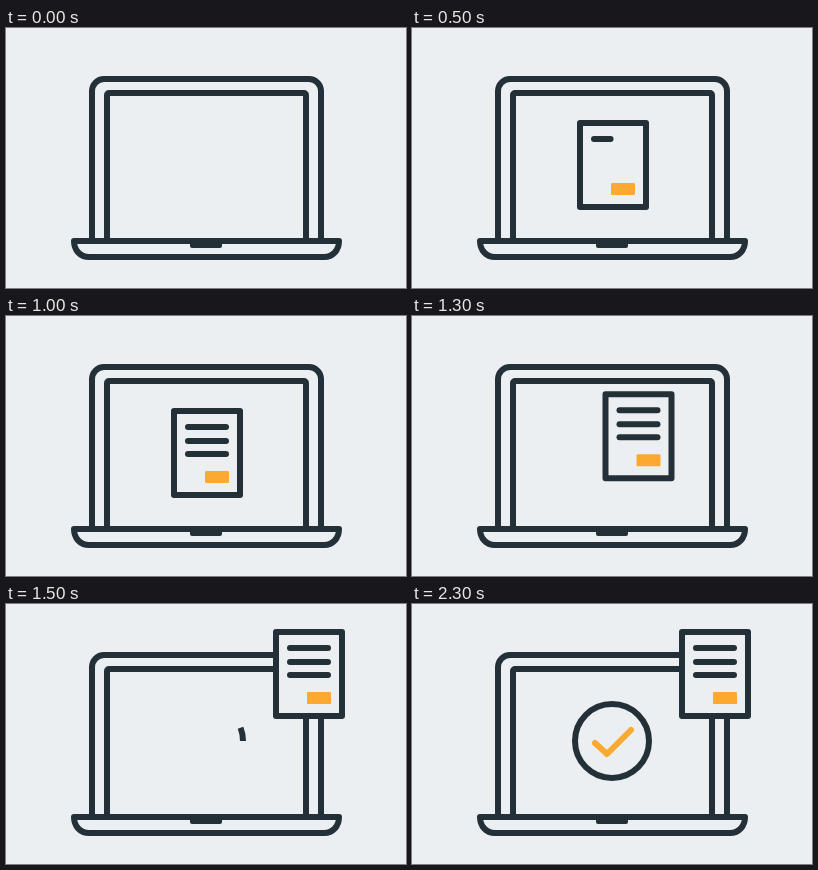
These frames come from a looping animation (400 by 260 pixels, 3.8 s). An HTML page:

```html
<!DOCTYPE html>
<html lang="en">
<head>
<meta charset="utf-8">
<title>Document approval</title>
<style>
  html, body { margin: 0; width: 100%; height: 100%; overflow: hidden; background: #ebeff2; }
  svg { display: block; width: 100%; height: 100%; }
  .ink { fill: none; stroke: #243038; stroke-width: 6; stroke-linejoin: round; }
  .round { stroke-linecap: round; }
  .paper { fill: #ebeff2; }
  .accent { fill: #fba930; }
  #check { stroke: #fba930; }
</style>
</head>
<body>
<svg viewBox="0 0 400 260">
  <path class="ink" d="M86 213V63a12 12 0 0 1 12-12H303a12 12 0 0 1 12 12V213"/>
  <path class="ink" d="M101 213V67a2 2 0 0 1 2-2H298a2 2 0 0 1 2 2V213"/>
  <path class="ink" d="M68 213H333C333 222 327 229 318 229H83C74 229 68 222 68 213Z"/>
  <path fill="#243038" d="M184 212h32v6a2 2 0 0 1-2 2h-28a2 2 0 0 1-2-2z"/>

  <path id="ring" class="ink" pathLength="1" d="M237 137A37 37 0 0 0 163 137A37 37 0 0 0 237 137"/>
  <path id="check" class="ink round" pathLength="1" d="M183 139L195 150L219 126"/>

  <g id="doc">
    <rect class="ink paper" x="168" y="95" width="66" height="84"/>
    <path id="line1" class="ink round" pathLength="1" d="M182 111H220"/>
    <path id="line2" class="ink round" pathLength="1" d="M182 125H220"/>
    <path id="line3" class="ink round" pathLength="1" d="M182 138H220"/>
    <rect class="accent" x="199" y="155" width="24" height="12" rx="1"/>
  </g>
</svg>
<script>
  const LOOP = 3800, STEP = 100;
  const get = id => document.getElementById(id);
  const sine = p => (1 - Math.cos(Math.PI * p)) / 2;
  const cubic = p => p < 0.5 ? 4 * p ** 3 : 1 - 4 * (1 - p) ** 3;
  const doc = get('doc');

  // id, start, end, easing of each stroke that draws itself
  const strokes = [
    ['line1', 415, 600, sine],
    ['line2', 600, 800, sine],
    ['line3', 800, 1000, sine],
    ['ring', 1403, 1800, cubic],
    ['check', 1790, 2300, sine],
  ].map(([id, ...timing]) => [get(id), ...timing]);

  function progress(t, start, end, ease) {
    return ease(Math.min(1, Math.max(0, (t - start) / (end - start))));
  }

  function draw(t) {
    for (const [path, ...timing] of strokes) {
      const p = progress(t, ...timing);
      path.style.visibility = p > 0 ? 'visible' : 'hidden';
      path.setAttribute('stroke-dasharray', p < 1 ? `${p} 2` : 'none');
    }
    const grow = progress(t, 0, 400, sine);
    const move = progress(t, 1200, 1500, sine);
    doc.style.visibility = grow > 0 ? 'inherit' : 'hidden';
    doc.style.display = grow > 0 ? 'inline' : 'none';
    doc.setAttribute('transform',
      `translate(${201 + 102 * move} ${137 - 67 * move}) scale(${grow}) translate(-201 -137)`);
  }

  const origin = performance.now();
  function tick() {
    const t = (performance.now() - origin) % LOOP;
    draw(Math.floor(t / STEP) * STEP);
    requestAnimationFrame(tick);
  }
  tick();
</script>
</body>
</html>
```
